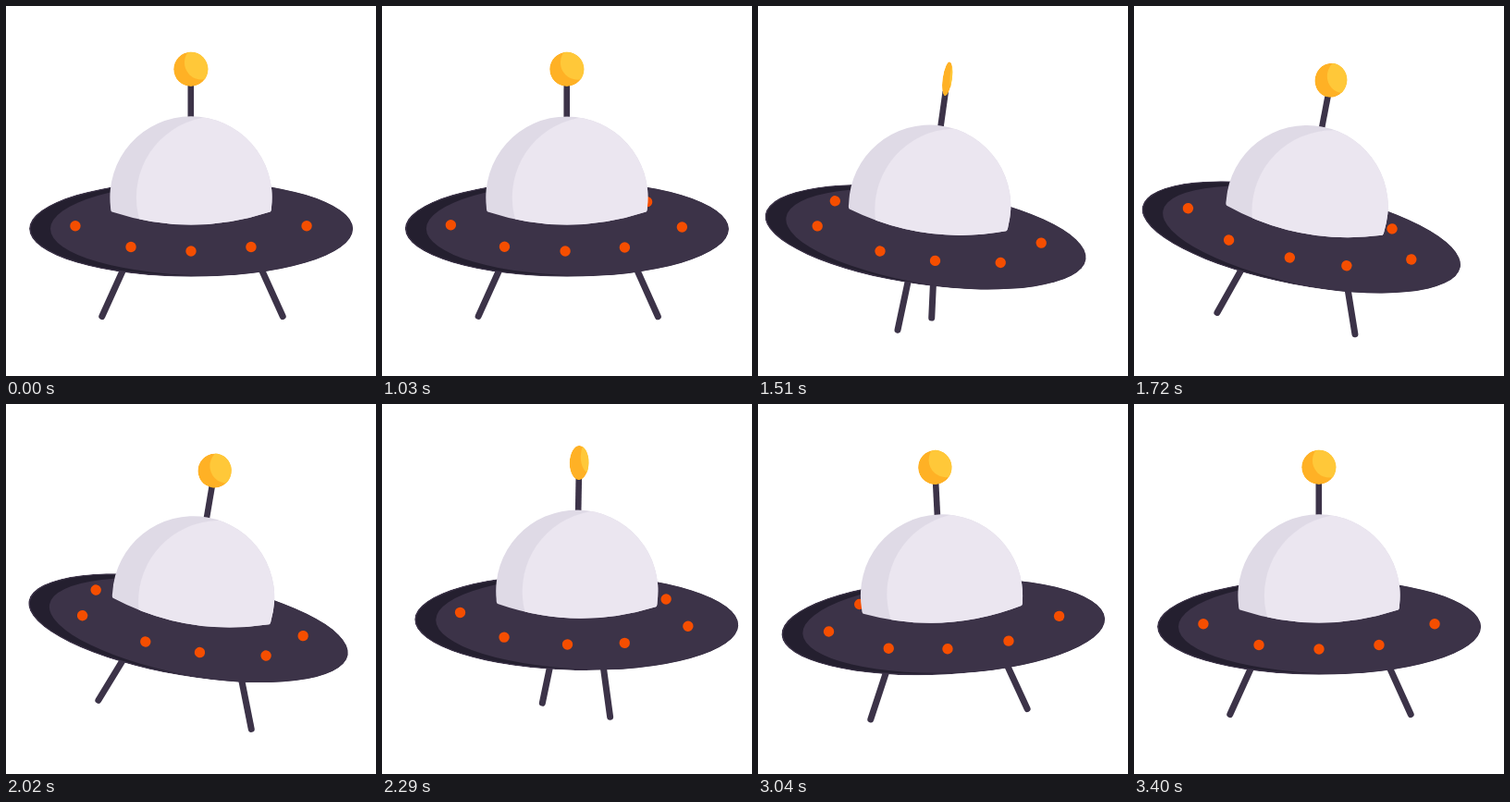
Write an HTML page that moves like this. It is 400 px wide and 400 px high and loops after 3.43 s.

```html
<!DOCTYPE html>
<html lang="en">
<head>
<meta charset="utf-8">
<title>Flying saucer</title>
<style>
  html, body { margin: 0; width: 100%; height: 100%; overflow: hidden; background: #fff; }
  svg { display: block; width: 100vw; height: 100vh; }
</style>
</head>
<body>
<svg viewBox="0 0 400 400">
  <defs>
    <clipPath id="discClip"><ellipse cy=".8" rx="175" ry="51.9"/></clipPath>
    <clipPath id="domeClip">
      <path d="M-85.5 -17.6 Q-87 -18 -87 -22.8 A87.6 87.6 0 1 1 87 -22.8 Q87 -18 85.5 -17.6 Q0 10.5 -85.5 -17.6Z"/>
    </clipPath>
    <clipPath id="ballClip"><circle r="18.6"/></clipPath>
  </defs>
  <!-- origin is the middle of the disc -->
  <g id="ship">
    <g id="legs" stroke="#3c3348" stroke-width="7" stroke-linecap="round">
      <line/><line/>
    </g>
    <g clip-path="url(#discClip)">
      <ellipse cy=".8" rx="175" ry="51.9" fill="#3c3348"/>
      <ellipse cy=".8" rx="173.2" ry="50.4" fill="#241f2f"/>
      <ellipse cx="23" cy=".8" rx="175" ry="50.6" fill="#3c3348"/>
    </g>
    <g id="dots" fill="#f54e00"></g>
    <path d="M-.2 -158 V-115" stroke="#3c3348" stroke-width="6.6"/>
    <g clip-path="url(#domeClip)">
      <rect x="-90" y="-125" width="180" height="125" fill="#dfdae6"/>
      <circle cx="28.5" cy="-33" r="87.6" fill="#ebe6f0"/>
    </g>
    <g id="ball" clip-path="url(#ballClip)">
      <circle r="18.6" fill="#ffb125"/>
      <circle id="shine" cy="-7.3" r="18.6" fill="#ffc839"/>
    </g>
  </g>
</svg>
<script>
const LOOP = 3430, REST = 1000, MOVE = 2400, STEP = 30;
const { PI, abs, sin, cos, floor, min, max } = Math;

const $ = id => document.getElementById(id);
const ship = $('ship'), ball = $('ball'), shine = $('shine');
const legs = [...$('legs').children];

const dots = Array.from({ length: 7 }, () => {
  const dot = document.createElementNS('http://www.w3.org/2000/svg', 'circle');
  dot.setAttribute('r', 5.7);
  return $('dots').appendChild(dot);
});

function set(el, attrs) {
  for (const k in attrs) el.setAttribute(k, attrs[k]);
}

const part = (k, a, b) => min(1, max(0, (k - a) / (b - a)));

// soft at both ends
function ramp(k, a, b) {
  const f = part(k, a, b);
  return f * f * (3 - 2 * f);
}

// quick start, long soft landing
function glide(k, a, b) {
  const f = part(k, a, b);
  return 1 - (1 - f) ** 2.5 * (1 + 1.7 * f);
}

// triangle wave: 1 at 0, -1 at 2, period 4
const tri = p => abs((p + 4) % 4 - 2) - 1;

// u counts dots from the front centre; they bunch up along the front
function rimPoint(u) {
  const angle = (42.3 * u - 11.3 * sin(1.5 * u)) * PI / 180;
  return { cx: 126 * sin(angle), cy: 31 * cos(angle) - 6 };
}

// k runs from 0 to 1 over the moving part of the loop
function draw(k) {
  const sway = -19.6 * ramp(k, 0, .24) + 30 * ramp(k, .28, .55) - 10.4 * ramp(k, .585, .87);
  const tilt = 11 * ramp(k, 0, .325) - 15.7 * ramp(k, .375, .65) + 4.7 * ramp(k, .74, 1);
  const spin = 2 * ramp(k, 0, .38) + 2 * glide(k, .38, 1); // quarter turns
  const travel = 3 * glide(k, 0, 1); // dot spacings

  set(ship, { transform: `translate(${200 + sway} ${240 - .47 * sway}) rotate(${tilt})` });

  legs.forEach((leg, i) => {
    const side = tri(spin + 2 * i), depth = tri(spin + 2 * i - 1);
    set(leg, { x1: 1.5 + 68 * side, y1: 30, x2: 1.5 + 97.7 * side, y2: 95.5 + 11 * depth });
  });

  dots.forEach((dot, i) => {
    const u = i - 3 + (3 - travel) % 1;
    set(dot, { ...rimPoint(u), visibility: abs(u) < 2.97 ? 'visible' : 'hidden' });
  });

  const width = max(.04, abs(cos(spin * PI / 2)));
  set(ball, { transform: `translate(-.2 -171.7) scale(${width} 1)` });
  set(shine, { cx: 11.7 + 22 * (1 - width) });
}

function frame(now) {
  const t = floor(now % LOOP / STEP) * STEP;
  // steps fall on 1030, 1060 and so on
  const tick = REST + floor((now % LOOP - REST) / STEP) * STEP;
  draw(part(max(t, tick), REST, REST + MOVE));
  requestAnimationFrame(frame);
}
draw(0);
requestAnimationFrame(frame);
</script>
</body>
</html>
```
